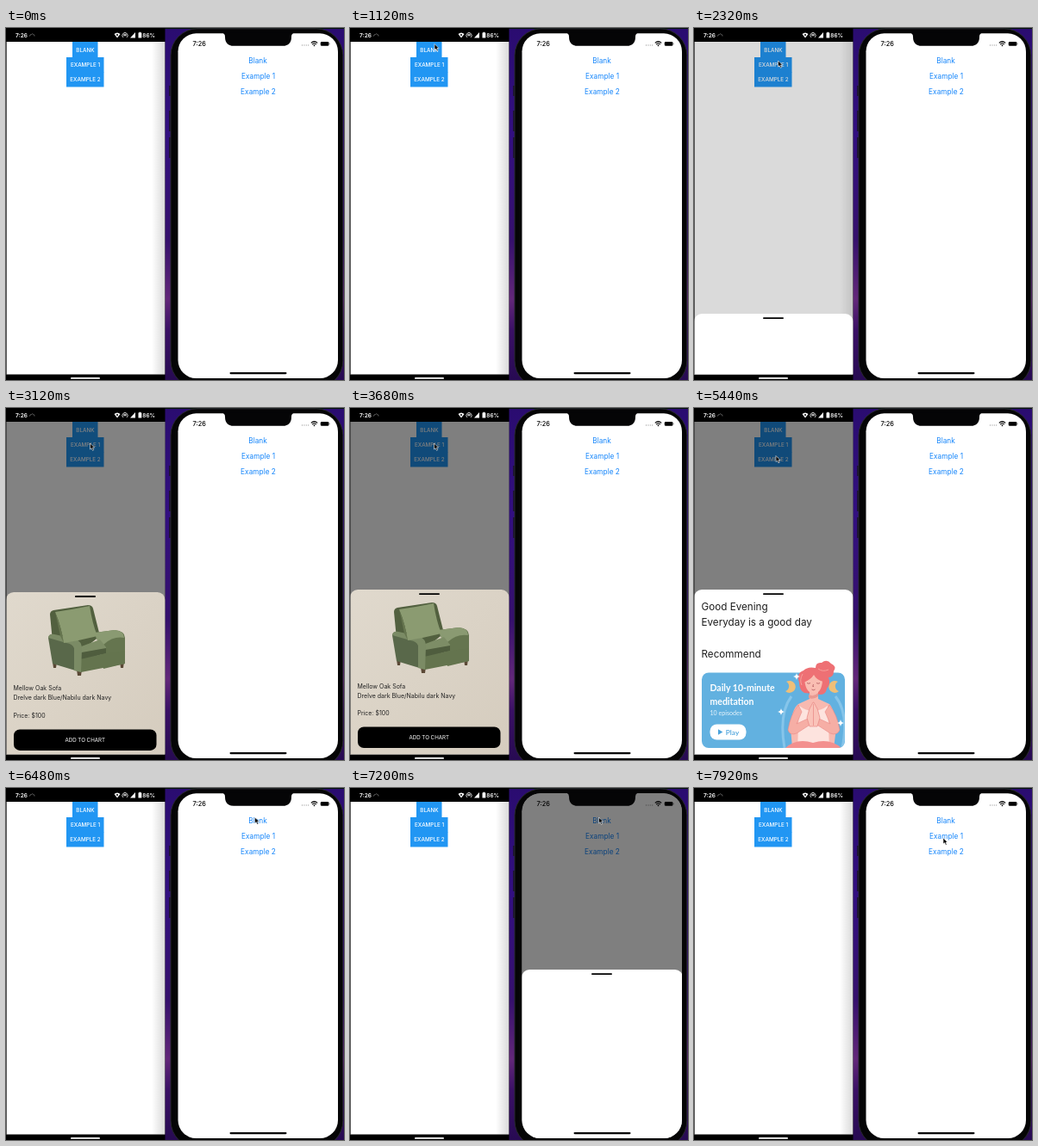
An HTML page that plays this animation: 392x409 px, repeating every 8 s.

```html
<!DOCTYPE html>
<html lang="en">
<head>
<meta charset="utf-8">
<title>Bottom sheet demo</title>
<style>
html, body { margin: 0; width: 100%; height: 100%; overflow: hidden; background: #000; }
svg { display: block; width: 392px; height: 409px; font-family: Inter, Roboto, sans-serif; }
.mid { text-anchor: middle; }
.btn { fill: #fff; font-size: 6.3px; font-weight: 500; }
.link { fill: #1485fb; font-size: 8.3px; }
.big { font-size: 11.7px; fill: #1c1c1c; }
.small { font-size: 7px; fill: #222; }
.card { font-family: Lato, "Open Sans", sans-serif; fill: #fff; }
</style>
</head>
<body>
<svg viewBox="0 0 392 409">
  <defs>
    <linearGradient id="wall" x2="0" y2="1">
      <stop offset="0" stop-color="#2a0c70"/>
      <stop offset=".3" stop-color="#320f80"/>
      <stop offset=".6" stop-color="#35106c"/>
      <stop offset=".77" stop-color="#622779"/>
      <stop offset=".86" stop-color="#3a1065"/>
      <stop offset="1" stop-color="#270a52"/>
    </linearGradient>
    <linearGradient id="fade">
      <stop offset="0" stop-color="#000" stop-opacity="0"/>
      <stop offset="1" stop-color="#000" stop-opacity=".15"/>
    </linearGradient>
    <linearGradient id="beige" x2="1" y2="1">
      <stop offset="0" stop-color="#e0d9cd"/>
      <stop offset="1" stop-color="#d5ccbe"/>
    </linearGradient>
    <clipPath id="droid"><rect y="16" width="184.500" height="386.500"/></clipPath>
    <clipPath id="ios"><rect x="199.500" y="6.300" width="185.500" height="400.700" rx="21"/></clipPath>
    <clipPath id="cardClip"><path d="M9 280H175V387a8 8 0 0 1-8 8H17a8 8 0 0 1-8-8z"/></clipPath>
    <path id="star" d="M0-4Q.6-.6 4 0Q.6.6 0 4Q-.6.6-4 0Q-.6-.6 0-4z" fill="#fff"/>
    <path id="panel" d="M0 403V220a9 9 0 0 1 9-9H175.500a9 9 0 0 1 9 9V403z"/>
    <rect id="grip" x="80" y="215.200" width="24" height="1.800" rx=".9"/>
  </defs>

  <rect width="392" height="409" fill="url(#wall)"/>
  <rect x="184" width="208" height="1" fill="#04140a"/>

  <!-- left phone -->
  <rect width="184.500" height="409" fill="#000"/>
  <g clip-path="url(#droid)">
    <rect x=".6" y="16" width="184" height="387" fill="#fff"/>
    <rect id="shade" x="169" y="16" width="15.500" height="387" fill="url(#fade)"/>
    <g fill="#2196f3">
      <rect x="77" y="16" width="29.500" height="18"/>
      <rect x="70" y="34" width="43.500" height="17.500"/>
      <rect x="70" y="51" width="43.500" height="17.500"/>
    </g>
    <g class="btn mid">
      <text x="92" y="27.500">BLANK</text>
      <text x="92" y="45">EXAMPLE 1</text>
      <text x="92" y="62.300">EXAMPLE 2</text>
    </g>
    <rect id="dimL" y="16" width="184.500" height="387" opacity="0"/>

    <g id="blank"><use href="#panel" fill="#fff"/><use href="#grip"/></g>

    <g id="sofa"><use href="#panel" fill="url(#beige)"/><use href="#grip"/>
      <path d="M54 292h5l-1 7h-3zM82 301h6l-1 7h-4zM132 291h5l-1 8h-3z" fill="#5b4936"/>
      <!-- back, side, right arm, seat, front, pillow -->
      <path d="M51 237Q51 233 55 232L95 226Q100 226 101 230L109 262L82 283L54 268z" fill="#52603f"/>
      <path d="M49 264Q50 259 56 260L78 267L87 304L54 294z" fill="#59684a"/>
      <path d="M103 258L126 255Q138 256 138 264V294L113 300L108 270z" fill="#65754f"/>
      <path d="M103 258L126 255Q137 256 137 264Q124 262 113 272L105 266z" fill="#8a9a72"/>
      <path d="M82 276L109 266L116 275V281L88 289z" fill="#7d8d66"/>
      <path d="M82 282L116 276V282L88 290z" fill="#4f5d3e"/>
      <path d="M86 289L116 282L138 279V294L87 304z" fill="#64744e"/>
      <path d="M49 264Q50 259 56 260L80 265Q88 268 88 277L87 304L79 302V276Q77 271 70 270z" fill="#7b8b65"/>
      <path d="M57 234Q78 231 97 227Q100 247 106 262Q86 267 67 270Q64 251 57 234z" fill="#8b9b71"/>
      <path d="M57 234Q64 251 67 270L63 262Q60 247 57 234z" fill="#66754f"/>
      <g class="small">
        <text x="8.500" y="325.500">Mellow Oak Sofa</text>
        <text x="8.500" y="336.500">Drelve dark Blue/Nabilu dark Navy</text>
        <text x="8.500" y="356.700">Price: $100</text>
      </g>
      <rect x="9" y="370.500" width="165.500" height="24.500" rx="7"/>
      <text class="mid" x="91.700" y="385" font-size="6.200" fill="#fff">ADD TO CHART</text>
    </g>

    <g id="calm"><use href="#panel" fill="#fff"/><use href="#grip"/>
      <g class="big">
        <text x="8.500" y="235">Good Evening</text>
        <text x="8.500" y="253">Everyday is a good day</text>
        <text x="8.500" y="290">Recommend</text>
      </g>
      <rect x="9" y="307.500" width="166" height="87.500" rx="8" fill="#62b1e0"/>
      <g clip-path="url(#cardClip)">
        <path d="M105 395Q98 355 113 335M172 395Q180 355 164 335" fill="none" stroke="#86c5ea" stroke-width="3"/>
        <path d="M107 318a7 7 0 1 1-1 11a6 6 0 0 0 1-11zM167 318a7 7 0 1 0 1 11a6 6 0 0 1-1-11z" fill="#efbf78"/>
        <!-- hair -->
        <path d="M122 319Q118 308 127 305Q132 300 141 302Q141 295 148 296Q154 291 159 297Q166 300 162 306Q162 313 156 313Q159 321 154 326Q153 333 147 333L128 331Q122 328 122 319z" fill="#ee7074"/>
        <path d="M144 303Q149 307 156 304M126 309Q122 316 125 322" fill="none" stroke="#f7a09c" stroke-width="1"/>
        <!-- body and top -->
        <path d="M134 326H144V338L157 344Q163 350 165 372L162 395H114L112 372Q113 350 121 344L134 338z" fill="#f8b9b0"/>
        <path d="M122 346Q130 352 138 352Q147 352 155 346L157 395H120z" fill="#fde3de"/>
        <path d="M133 333Q139 336 144 331V335Q139 339 133 337z" fill="#e99991"/>
        <!-- face -->
        <path d="M128 314Q130 307 138 307Q148 307 149 317Q148 331 139 332Q129 331 128 314z" fill="#f9bdb2"/>
        <path d="M127 319Q126 306 138 305Q149 305 150 318Q142 316 139 310Q135 316 127 319z" fill="#ee7074"/>
        <path d="M131 319.500q2 1.500 4 0M142 319.500q2 1.500 4 0M136.500 327q2 1.500 4 0M138.500 321l-.8 2.500h1.300" fill="none" stroke="#a64b52" stroke-width=".7"/>
        <!-- arms and hands -->
        <path d="M121 345Q112 356 109 374Q111 381 119 378L136 367L134 360L119 367L125 353zM157 345Q166 356 169 374Q166 381 158 378L141 367L143 360L158 367L152 353z" fill="#f6aea5" stroke="#e98a87" stroke-width=".6"/>
        <path d="M138 342Q133 349 131 360L134 370H143L146 360Q144 349 139 342zM138.500 344V369" fill="#fac3b9" stroke="#e47d7b" stroke-width=".6"/>
        <path d="M106 395Q119 383 138 389Q157 383 171 395z" fill="#f3908e"/>
      </g>
      <use href="#star" x="119" y="312"/>
      <use href="#star" x="101" y="353"/>
      <use href="#star" x="170" y="366"/>
      <g class="card">
        <g font-size="10.500" font-weight="700">
          <text x="18.500" y="329">Daily 10-minute</text>
          <text x="18.500" y="345">meditation</text>
        </g>
        <text x="18.500" y="357" font-size="7.100" opacity=".85">10 episodes</text>
        <rect x="18.500" y="367.500" width="42" height="18" rx="8"/>
        <path d="M28 373.200v6.600l5.300-3.300z" fill="#4ba3dc"/>
        <text x="36.800" y="379.600" font-size="8.300" font-weight="600" fill="#4ba3dc">Play</text>
      </g>
    </g>
  </g>
  <path d="M.4 16V402.500" stroke="#555" stroke-width=".8"/>
  <rect x="75" y="406" width="34" height="1.800" rx=".9" fill="#fff"/>
  <g fill="#fff">
    <text x="11" y="10.600" font-size="6.600" font-weight="600">7:26</text>
    <path d="M27.500 9.500q0-2 2-2q1-1.500 2.300 0q1.500.3 1.200 2" fill="none" stroke="#777" stroke-width=".8"/>
    <path d="M125.500 7q3.500-3 7 0l-3.500 4.500zM144 11.500h6V5z"/>
    <circle cx="129" cy="8" r="1" fill="#000"/>
    <path d="M136 11a3.100 3.100 0 1 1 4 0M136.800 9a1.300 1.300 0 1 1 2.400 0" fill="none" stroke="#fff" stroke-width=".8"/>
    <circle cx="138" cy="8.700" r=".8"/>
    <path d="M153.500 5.500h1v-.8h1.800v.8h1v6h-3.800z"/>
    <text x="158.300" y="10.600" font-size="6.400" font-weight="600">86%</text>
  </g>

  <!-- right phone -->
  <path d="M190 67v12M190 96v24M190 127v24" stroke="#17151b" stroke-width="1.500"/>
  <rect x="191" y=".8" width="199.800" height="417" rx="31" fill="#050506" stroke="#28282f" stroke-width="1"/>
  <g clip-path="url(#ios)">
    <rect x="199" y="6" width="187" height="402" fill="#fff"/>
    <text x="216.500" y="20.800" font-size="7.300" font-weight="500">7:26</text>
    <path d="M343 20h8.500" stroke="#888" stroke-width="1" stroke-dasharray="1 1.400"/>
    <path d="M353.800 17.400q3.700-3.300 7.400 0M355.200 19q2.300-2 4.600 0" fill="none" stroke="#000" stroke-width="1.200"/>
    <circle cx="357.500" cy="20.300" r=".9"/>
    <rect x="364.800" y="16" width="9.600" height="4.800" rx="1.300"/>
    <path d="M375.200 17.500v1.800" stroke="#777" stroke-width=".7"/>
    <g class="link mid">
      <text x="292" y="41">Blank</text>
      <text x="292.500" y="59">Example 1</text>
      <text x="292.500" y="76.700">Example 2</text>
    </g>
    <rect id="dimR" x="199" y="6" width="187" height="402" opacity="0"/>
    <g id="blankR"><path d="M199 408V220a9 9 0 0 1 9-9H377a9 9 0 0 1 9 9V408z" fill="#fff"/>
      <use href="#grip" x="200"/></g>
  </g>
  <path d="M250 5.500Q254 6 254 10Q254 20.800 264 20.800H321Q331 20.800 331 10Q331 6 335 5.500z" fill="#050506"/>
  <rect x="259.500" y="400" width="66" height="2.200" rx="1.100"/>

  <path id="cursor" d="M0 0V7L1.700 5.600L2.900 8.300L4.200 7.700L3 5.100H5.100z" fill="#000" stroke="#fff" stroke-width=".6"/>
</svg>
<script>
const LOOP = 8000, RISE = 400;
const $ = id => document.getElementById(id);

// sheet, backdrop, travel, open time, close time
const sheets = [
  ['blank', 'dimL', 192, 1250, 2093],
  ['sofa', 'dimL', 192, 2820, 3960],
  ['calm', 'dimL', 192, 4700, 5700],
  ['blankR', 'dimR', 197, 6620, 7280]
];

// time, x, y of the pointer tip
const path = [
  [560, 184, 130], [960, 98, 18.5], [1650, 98, 18.5], [1950, 97.5, 38],
  [2500, 97.5, 38], [2750, 97.5, 41], [4300, 97.5, 41], [4550, 95, 55.5],
  [5900, 95, 55.5], [6380, 288.5, 34], [7350, 288.5, 34], [7700, 289, 58],
  [LOOP, 289, 58]
];

const clamp = x => Math.max(0, Math.min(1, x));
const smooth = x => x < .5 ? 2 * x * x : 1 - 2 * (1 - x) ** 2;
const out = x => 1 - (1 - x) ** 3;

function moveCursor(t) {
  const el = $('cursor');
  const i = path.findIndex(p => p[0] > t);
  el.style.display = i > 0 ? '' : 'none';
  if (i < 1) return;
  const [t0, x0, y0] = path[i - 1], [t1, x1, y1] = path[i];
  const k = smooth((t - t0) / (t1 - t0));
  el.setAttribute('transform', `translate(${x0 + (x1 - x0) * k} ${y0 + (y1 - y0) * k})`);
}

function draw(t) {
  const dim = { dimL: 0, dimR: 0 };
  for (const [id, back, travel, open, close] of sheets) {
    const p = out(clamp((t - open) / RISE)) - smooth(clamp((t - close) / RISE));
    const el = $(id);
    el.style.display = p > 0 ? '' : 'none';
    el.setAttribute('transform', `translate(0 ${travel * (1 - p)})`);
    dim[back] = Math.max(dim[back], .5 * Math.max(0, p) ** 1.25);
  }
  for (const id in dim) $(id).setAttribute('opacity', dim[id]);
  $('shade').setAttribute('opacity', 1 - 2 * dim.dimL);
  moveCursor(t);
}

const start = performance.now();
function tick() {
  draw((performance.now() - start) % LOOP);
  requestAnimationFrame(tick);
}
tick();
</script>
</body>
</html>
```
